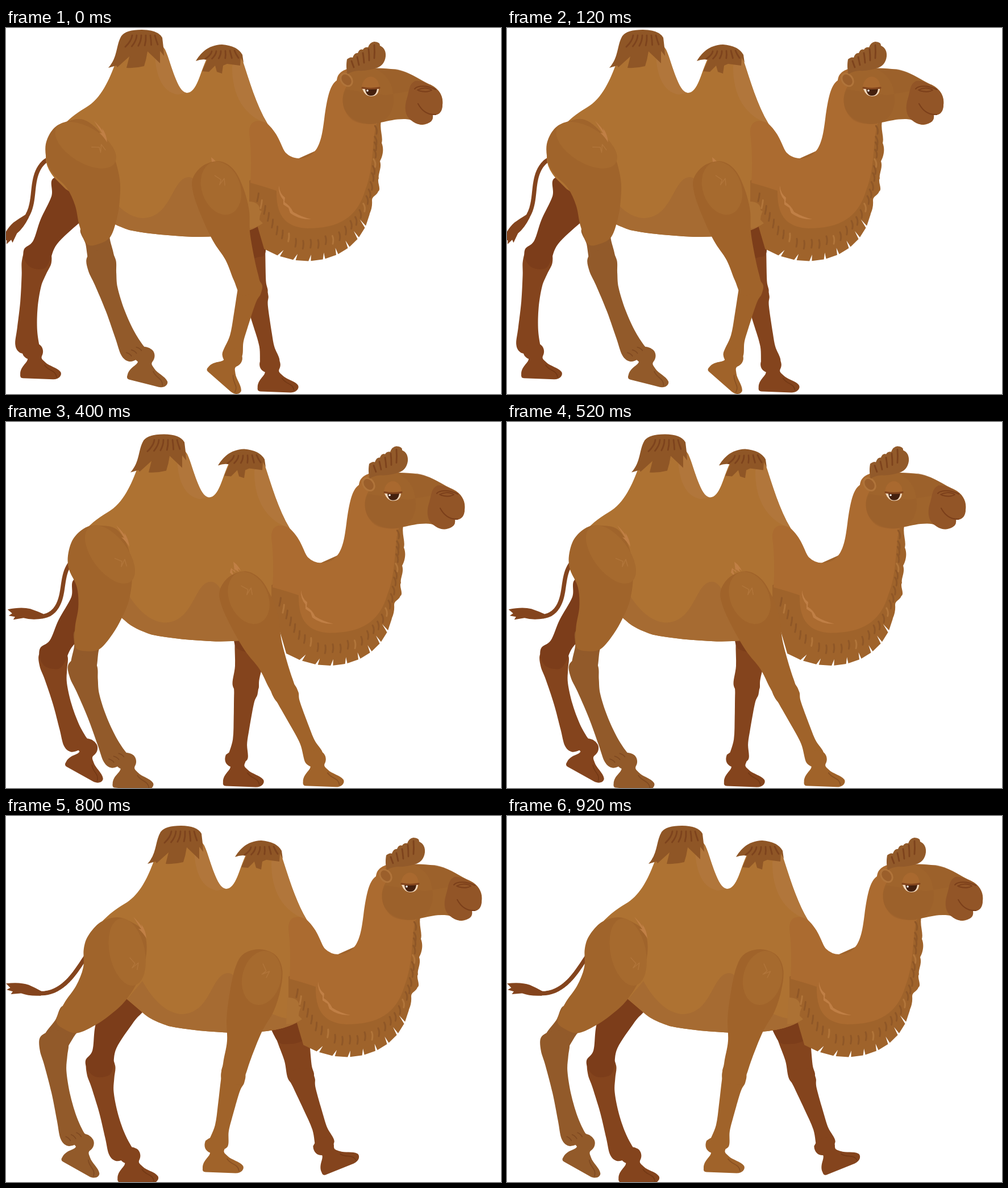
An HTML page for the animation above (1 s loop, 871 px wide and 643 px high).

```html
<!DOCTYPE html>
<html lang="en">
<head>
<meta charset="utf-8">
<title>Walking camel</title>
<style>
html, body { margin: 0; width: 100%; height: 100%; overflow: hidden; background: #fff; }
svg { display: block; width: 100%; height: 100%; }
</style>
</head>
<body>
<svg viewBox="0 0 871 643" fill="none" stroke-linecap="round" stroke-linejoin="round">
  <defs>
    <path id="hoof" d="M-15,-18C-19,-8 -15,0 -7,3C-7,10 -20,16 -20,30Q-21,37 -15,37L38,39C49,39 54,31 51,26C45,18 31,16 24,9C20,5 16,3 18,-2C22,-9 20,-18 14,-22Q0,-30 -15,-18Z"/>
    <path id="toe" d="M23,14C30,25 42,22 44,35"/>
    <path id="zigzag" d="M-8,-9L1,1L-4,9L7,0L5,12"/>
    <path id="collar" d="M652,180C650,240 648,290 622,327C600,360 570,379 530,377C480,374 465,340 438,285"/>
  </defs>
  <g id="camel">
    <g id="far"></g>
    <path fill="#ae7232" d="M70,228C73,195 105,160 140,140C168,124 182,90 193,60L210,16H265L280,38C293,66 299,114 318,114C336,114 341,79 354,52L375,36H404L416,56C428,92 440,135 460,168L470,240L452,343C425,363 380,367 330,367C290,365 250,362 217,355C197,348 183,342 171,331L144,308L105,283L85,263Q70,245 70,228Z"/>
    <path fill="#a66b32" d="M171,276C190,310 215,334 242,334C292,332 292,262 322,262C340,262 345,300 375,320Q415,347 452,343C425,363 380,367 330,367C290,365 250,362 217,355C197,348 183,342 171,331L144,308Z"/>
    <path fill="#b1763b" d="M262,48C264,85 275,112 302,117L318,114C301,112 293,66 278,38ZM398,66C397,120 420,155 460,168C440,135 428,92 414,54Z"/>
    <path fill="#c07f45" d="M361,227Q370,233 374,243L369,239L371,245L363,240L365,246L358,241L362,252L355,246L357,238L363,243L362,235Z"/>
    <path id="fringe" fill="#9f632b"/>
    <path fill="#ab6b30" d="M428,185C427,160 446,160 460,168C482,189 484,209 492,219Q502,229 516,229C552,229 556,190 560,160C565,122 570,100 582,92C583,86 584,78 600,72L660,120L651,172C644,196 648,245 632,285C618,333 586,352 530,352C494,350 475,332 476,286Q456,279 430,272Q433,225 428,185Z"/>
    <path fill="#c07f45" d="M480,277Q482,292 491,298L490,306Q500,312 505,323Q519,332 537,336Q516,337 500,325L497,316L488,310V302Q479,292 480,277Z"/>
    <g id="hairs" stroke-width="3"></g>
    <path id="flank" fill="#ac7134" d="M426,305C440,304 448,312 446,320L450,322Q446,330 446,337L452,343Q440,352 424,352Z"/>

    <path fill="#9f642c" d="M598,78C630,69 660,69 685,73C712,77 728,92 748,100C764,108 770,122 768,135C767,148 760,154 750,153C755,165 735,173 726,169C718,165 715,160 700,160C684,160 675,163 659,166C645,171 612,170 598,147C589,132 592,112 600,102Z"/>
    <path fill="#9b5f2b" opacity=".55" d="M598,108C588,125 592,148 610,162C625,171 647,170 659,166C675,158 683,142 682,123C680,92 668,82 650,72H685C712,77 728,92 748,100L715,110L668,118Z"/>
    <path fill="#925527" d="M720,93C708,99 710,111 705,125C700,142 703,156 714,163C724,171 732,170 740,168Q753,165 751,153C763,154 768,146 768,135C769,113 757,105 745,100Q730,91 720,93Z"/>
    <path stroke="#7b3f1a" stroke-width="2" d="M719,107C724,101 740,100 756,108M726,110C733,112 743,113 749,109C741,104 731,105 724,109M725,133C732,146 742,153 756,152"/>
    <ellipse cx="599" cy="91" rx="9" ry="12" transform="rotate(-38 599 91)" fill="#9b5f2b" stroke="#b0743a" stroke-width="3"/>
    <path fill="#a9692f" d="M626,105C627,80 656,78 657,105Z"/>
    <path fill="#f3d9bd" d="M627,107Q632,120 642,120Q655,120 656,107Z"/>
    <path fill="#43200e" d="M632,106Q633,119 642,119Q652,119 653,106Z"/>
    <circle cx="636" cy="110" r="1.8" fill="#fff"/>
    <path stroke="#83451d" stroke-width="3" d="M627,105Q642,108 657,105"/>
    <path fill="#925a2a" d="M601,81C598,70 599,61 600,55Q606,50 610,52Q613,43 619,44Q622,36 628,38Q631,33 637,34Q640,25 648,24Q659,25 658,31Q669,36 668,50Q666,65 653,70Q635,76 620,75Q608,76 601,81Z"/>
    <path fill="#8f5626" d="M180,70C197,51 193,31 203,14Q211,3 239,3Q267,3 275,17L277,34L278,49L271,40L271,62L249,41Q247,55 243,67Q228,71 212,70L217,50L196,69L194,66Z"/>
    <path fill="#8f5626" d="M334,58C342,45 354,30 380,29Q407,31 416,47L418,61L413,52L412,66L389,63L382,66L380,80L371,77L368,66L357,77L345,76L354,56Q344,54 334,58Z"/>
    <g id="strands" stroke="#7d431d" stroke-width="2.8"></g>
    <g id="near"></g>
    <path fill="#c07f45" d="M155,163Q166,174 170,181L169,176Q177,187 178,201Q172,191 164,184L169,185Z"/>
  </g>
</svg>
<script>
const byId = id => document.getElementById(id);
const camel = byId('camel'), far = byId('far'), near = byId('near'), flank = byId('flank');

function add(parent, tag, attrs = {}) {
  const el = document.createElementNS('http://www.w3.org/2000/svg', tag);
  for (const key in attrs) el.setAttribute(key, attrs[key]);
  return parent.appendChild(el);
}

const place = (el, x, y, angle = 0) =>
  el.setAttribute('transform', `translate(${x} ${y}) rotate(${angle})`);

// Closed smooth curve through a few points.
function smooth(text) {
  const p = text.split(' ').map(pair => pair.split(',').map(Number)), n = p.length;
  let d = 'M' + p[0];
  p.forEach((a, i) => {
    const before = p[(i + n - 1) % n], b = p[(i + 1) % n], after = p[(i + 2) % n];
    const c1 = [0, 1].map(j => a[j] + (b[j] - before[j]) / 6);
    const c2 = [0, 1].map(j => b[j] - (after[j] - a[j]) / 6);
    d += `C${c1} ${c2} ${b}`;
  });
  return d + 'Z';
}

// Bone shapes hang straight down from their joint at 0,0.
const hindShin = '-20,-14 -26,8 -25,35 -25,85 -28,135 -30,167 -22,182 -6,184 17,180 12,165 7,135 6,95 10,55 18,30 26,8 22,-14 0,-20';
const frontShin = '-20,-14 -18,10 -13,50 -9,90 -13,125 0,132 21,122 17,95 17,70 19,22 23,5 20,-12 0,-20';
const dark = { color: '#84441d', line: '#733815', thighColor: '#7c3d1a' };

const limbs = {
  farHind: limb(far, {
    ...dark, hip: [170, 232], bones: [207, 175], shin: hindShin, shinScale: 0.92,
    thigh: '0,40 -53,73 -39,103 -32,148 -22,186 -27,207 -16,222 2,227 21,216 22,199 16,167 28,113 40,70'
  }),
  farFront: limb(far, {
    ...dark, hip: [415, 255], bones: [207, 134], shin: frontShin,
    stem: '-36,80 -31,129 -24,169 -22,205 0,218 22,205 22,184 26,139 32,80',
    thigh: '-36,75 -31,131 -10,142 12,141 27,133 32,75'
  }),
  hind: limb(near, {
    color: '#925a2a', line: '#7f4921', thighColor: '#a0642b',
    hip: [120, 220], bones: [195, 190], shin: hindShin,
    stem: '-18,130 -18,160 -19,195 0,205 24,197 26,158 36,130',
    thigh: '-45,-27 -26,-50 -2,-57 29,-54 53,-25 66,18 67,64 58,100 46,129 27,158 3,165 -16,160 -21,126 -20,90 -27,56 -44,28 -50,4',
    oval: { cx: 23, cy: -9, rx: 31, ry: 60, transform: 'rotate(-45 23 -9)' },
    mark: [44, 0, -33], wrinkled: true
  }),
  front: limb(near, {
    color: '#a0632a', line: '#874f22', thighColor: '#a0632a',
    hip: [378, 285], bones: [181, 134], shin: frontShin,
    thigh: '-38,-8 -30,-33 -5,-48 25,-45 43,-23 48,12 45,52 33,92 25,142 22,172 18,190 -16,190 -21,160 -23,122 -33,82 -38,32',
    oval: { cx: 11, cy: 0, rx: 34, ry: 48 }, mark: [15, -15, 5]
  })
};

// Nested joints; angles are measured forward from straight down.
function limb(parent, o) {
  const upper = add(parent, 'g');
  if (o.stem) add(upper, 'path', { fill: o.color, d: smooth(o.stem) });
  const lower = add(upper, 'g');
  add(lower, 'path', { fill: o.color, d: smooth(o.shin), transform: `scale(1 ${o.shinScale || 1})` });
  const foot = add(lower, 'g');
  add(foot, 'use', { href: '#hoof', fill: o.color });
  add(foot, 'use', { href: '#toe', stroke: o.line, 'stroke-width': 1.6 });
  if (o.wrinkled) {
    for (let i = 0; i < 3; i++) {
      add(lower, 'path', { stroke: o.line, 'stroke-width': 1.6, d: `M${-20 + i * 10},${166 - i}q5,4 6,9` });
    }
  }
  add(upper, 'path', { fill: o.thighColor, d: smooth(o.thigh) });
  if (o.oval) add(upper, 'ellipse', { fill: '#a66a2e', ...o.oval });
  if (o.mark) place(add(upper, 'use', { href: '#zigzag', stroke: '#b1753a', 'stroke-width': 1.5 }), ...o.mark);

  return ([thigh, shin, sole, dx = 0, dy = 0]) => {
    place(upper, o.hip[0] + dx, o.hip[1] + dy, -thigh);
    place(lower, 0, o.bones[0], thigh - shin);
    place(foot, 0, o.bones[1], sole + shin);
  };
}

const tail = add(far, 'path', { stroke: '#84441d', 'stroke-width': 7.5 });
const tuft = add(far, 'path', {
  fill: '#84441d',
  d: 'M-3,-4Q18,-7 32,-3L50,-6L47,-1L58,1L52,5L60,12Q36,17 20,13Q8,9 -3,4Z'
});

// The tail's heading bends smoothly through its base, middle and end angles.
function bendTail([base, middle, end]) {
  const steps = 24, step = 112 / steps;
  let x = 73, y = 231, d = `M${x},${y}`;
  for (let i = 0; i < steps; i++) {
    const s = (i + 0.5) / steps;
    const angle = base * (1 - s) * (1 - 2 * s) + 4 * middle * s * (1 - s) + end * s * (2 * s - 1);
    x += step * Math.cos(angle * Math.PI / 180);
    y += step * Math.sin(angle * Math.PI / 180);
    d += `L${x},${y}`;
  }
  tail.setAttribute('d', d);
  place(tuft, x, y, end);
}

// Chest fringe: a wavy throat edge, then teeth along a curve.
function drawFringe() {
  const teeth = 9, hem = [[640, 326], [625, 400], [535, 436], [452, 387]];
  const at = t => [0, 1].map(j => {
    const u = 1 - t;
    return u ** 3 * hem[0][j] + 3 * u * u * t * hem[1][j] + 3 * u * t * t * hem[2][j] + t ** 3 * hem[3][j];
  });
  let d = 'M660,164C657,178 664,192 661,202C666,214 662,227 658,234C662,245 654,257 656,264C652,270 661,283 655,287C652,295 644,295 644,303Q645,315 640,326';
  for (let i = 0; i < teeth; i++) {
    const [x, y] = at((i + 0.92) / teeth);
    d += `L${at((i + 0.08) / teeth)}L${x},${y}`;
    if (i < teeth - 1) d += `l${(540 - x) / 9},-11`;
  }
  byId('fringe').setAttribute('d', d + 'L443,350L428,325V268Z');
}

function drawHairs() {
  let seed = 7;
  const random = () => (seed = seed * 16807 % 2147483647) / 2147483647;
  const collar = byId('collar'), gap = 13.5;
  for (let i = 0; i * gap < collar.getTotalLength(); i++) {
    const { x, y } = collar.getPointAtLength(i * gap);
    const lean = (x - 545) / 40, top = y - 8 + random() * 6;
    add(byId('hairs'), 'path', {
      stroke: i % 6 === 4 ? '#b1753a' : '#8f5727',
      d: `M${x - lean},${top}q${lean + 2},6 ${lean},14`
    });
  }
}

// A fan of strands; each one starts a step further on and leans a little more.
function fan(count, x, y, dx, dy, lean, spread, length, growth) {
  for (let i = 0; i < count; i++) {
    const tilt = lean + spread * i, drop = length + growth * i;
    add(byId('strands'), 'path', { d: `M${x + dx * i},${y + dy * i}q${tilt * 0.2 + 1},${drop / 2} ${tilt},${drop}` });
  }
}

drawFringe();
drawHairs();
fan(6, 222, 13, 8, 0, -12, 3.4, 20, -0.8);
fan(6, 362, 41, 8, -0.3, -11, 3.6, 13, 0);
fan(5, 608, 58, 10, -7, 4, -1, 11, 3);

// Torso offset, tail bend, then thigh, shin and sole angles with an optional hip shift.
const poses = [
  { at: [0, 0], tail: [150, 97, 125],
    farHind: [-34, -3, 0], farFront: [6.4, 10.6, 0, 0, 9], hind: [13.6, 22.8, 12], front: [19.2, -16, 39, -10, 0] },
  { at: [56, -3.5], tail: [140, 140, 200],
    farHind: [-36.5, -3, 0], farFront: [-4.2, -1.3, 0, 0, 11], hind: [9, 22, 4], front: [34.8, -16, 41, -10, 0] },
  { at: [39, 18.5], tail: [125, 102, 180],
    farHind: [-38, 18.5, 27], farFront: [-9.3, -8, 0, 0, -8], hind: [-7.6, 23.4, 2], front: [24.2, 22.6, 0, 0, 10] },
  { at: [27.5, 12.5], tail: [135, 145, 95],
    farHind: [-20.6, 38.6, 12], farFront: [5.4, -66.4, 53, 0, 4], hind: [-33.5, -1.5, 2], front: [0, 1.3, 0, 0, -9] },
  { at: [69, 14], tail: [125, 135, 185],
    farHind: [-20.9, 17, 0], farFront: [10, 18, -24, 0, -10], hind: [-33, 14.6, 27], front: [-13.1, -13.8, 0, -8, -17] }
];

function show(pose) {
  place(camel, ...pose.at);
  bendTail(pose.tail);
  for (const name in limbs) limbs[name](pose[name]);
  // A front leg swung well forward hides the fold of the flank.
  flank.setAttribute('visibility', pose.front[0] < 20 ? 'visible' : 'hidden');
}

const HOLD = 200, start = performance.now();
let current = -1;
function tick() {
  const index = Math.floor((performance.now() - start) / HOLD) % poses.length;
  if (index !== current) show(poses[current = index]);
  requestAnimationFrame(tick);
}
tick();
</script>
</body>
</html>
```
